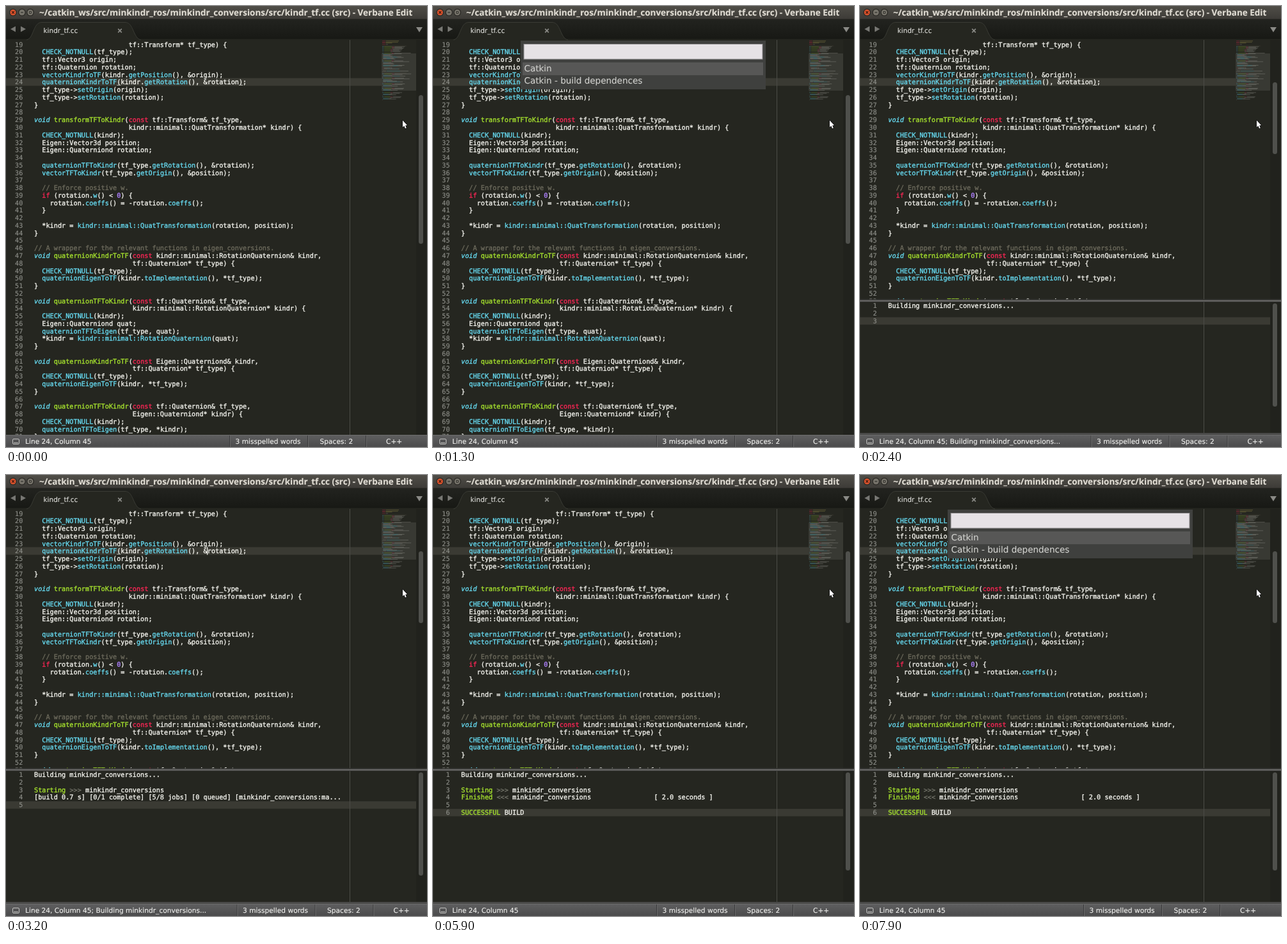
An HTML page with a canvas for the animation above (8 s loop, 658 px wide and 688 px high).

```html
<!DOCTYPE html>
<html lang="en">
<head>
<meta charset="utf-8">
<title>Build in editor</title>
<style>
  html, body { margin: 0; height: 100%; overflow: hidden; background: #252620; }
  canvas { display: block; }
</style>
</head>
<body>
<canvas id="stage" width="658" height="688"></canvas>
<script>
const ctx = document.getElementById('stage').getContext('2d');
const LOOP = 8000, STEP = 100;
const CHAR = 6.153, LINE = 11.765, LEFT = 44, FIRST = 19;
const MONO = '10.22px "DejaVu Sans Mono", monospace';
const SANS = '"DejaVu Sans", sans-serif';
const BG = '#252620', ACTIVE = '#3a3a33', WHITE = '#f4f4ee', GRAY = '#8d8e88';

// Times of the events, in ms
const MENU_OPEN = 500, PANEL_OPEN = 1700, BUILDING = 1900, STARTED = 2800,
      FINISHED = 5100, STATUS_RESET = 5700, MENU_AGAIN = 7400;

const COLORS = {
  comment: '#6c6a5c', type: '#66d9ef', name: '#a6e22e', keyword: '#f92655',
  call: '#66d9ef', number: '#ae81ff', string: '#d8c860', good: '#a6e22e', arrow: '#75766c'
};
const CPP = /(?<comment>\/\/.*)|(?<type>\bvoid\b)|(?<name>(?<=void )\w+)|(?<keyword>\bconst\b|\bif\b|#\w+|\bnamespace\b)|(?<call>[\w:]+(?=\())|(?<number>\b\d+\b)|(?<string>".*"|<.*>$)/g;
const LOG = /(?<good>Starting|Finished|SUCCESSFUL)|(?<arrow>>>>|<<<)/g;

const code = `#include "minkindr_conversions/kindr_tf.h"

#include <eigen_conversions/eigen_msg.h>
#include <glog/logging.h>

namespace tf {

// A wrapper for the relevant functions in eigen_conversions.
void quaternionKindrToTF(const Eigen::Quaterniond& kindr,
                         tf::Quaternion* tf_type);
void quaternionTFToKindr(const tf::Quaternion& tf_type,
                         Eigen::Quaterniond* kindr);
void vectorKindrToTF(const Eigen::Vector3d& kindr,
                     tf::Vector3* tf_type);
void vectorTFToKindr(const tf::Vector3& tf_type,
                     Eigen::Vector3d* kindr);

void transformKindrToTF(const kindr::minimal::QuatTransformation& kindr,
                        tf::Transform* tf_type) {
  CHECK_NOTNULL(tf_type);
  tf::Vector3 origin;
  tf::Quaternion rotation;
  vectorKindrToTF(kindr.getPosition(), &origin);
  quaternionKindrToTF(kindr.getRotation(), &rotation);
  tf_type->setOrigin(origin);
  tf_type->setRotation(rotation);
}

void transformTFToKindr(const tf::Transform& tf_type,
                        kindr::minimal::QuatTransformation* kindr) {
  CHECK_NOTNULL(kindr);
  Eigen::Vector3d position;
  Eigen::Quaterniond rotation;

  quaternionTFToKindr(tf_type.getRotation(), &rotation);
  vectorTFToKindr(tf_type.getOrigin(), &position);

  // Enforce positive w.
  if (rotation.w() < 0) {
    rotation.coeffs() = -rotation.coeffs();
  }

  *kindr = kindr::minimal::QuatTransformation(rotation, position);
}

// A wrapper for the relevant functions in eigen_conversions.
void quaternionKindrToTF(const kindr::minimal::RotationQuaternion& kindr,
                         tf::Quaternion* tf_type) {
  CHECK_NOTNULL(tf_type);
  quaternionEigenToTF(kindr.toImplementation(), *tf_type);
}

void quaternionTFToKindr(const tf::Quaternion& tf_type,
                         kindr::minimal::RotationQuaternion* kindr) {
  CHECK_NOTNULL(kindr);
  Eigen::Quaterniond quat;
  quaternionTFToEigen(tf_type, quat);
  *kindr = kindr::minimal::RotationQuaternion(quat);
}

void quaternionKindrToTF(const Eigen::Quaterniond& kindr,
                         tf::Quaternion* tf_type) {
  CHECK_NOTNULL(tf_type);
  quaternionEigenToTF(kindr, *tf_type);
}

void quaternionTFToKindr(const tf::Quaternion& tf_type,
                         Eigen::Quaterniond* kindr) {
  CHECK_NOTNULL(kindr);
  quaternionTFToEigen(tf_type, *kindr);
}

void vectorKindrToTF(const Eigen::Vector3d& kindr,
                     tf::Vector3* tf_type) {
  CHECK_NOTNULL(tf_type);
  vectorEigenToTF(kindr, *tf_type);
}

void vectorTFToKindr(const tf::Vector3& tf_type,
                     Eigen::Vector3d* kindr) {
  CHECK_NOTNULL(kindr);
  vectorTFToEigen(tf_type, *kindr);
}`.split('\n');

function tokenize(line, rule) {
  const tokens = [];
  let end = 0;
  const add = (text, col, kind) => text.trim() && tokens.push({ text, col, kind });
  for (const m of line.matchAll(rule)) {
    add(line.slice(end, m.index), end);
    add(m[0], m.index, Object.keys(m.groups).find(k => m.groups[k]));
    end = m.index + m[0].length;
  }
  add(line.slice(end), end);
  return tokens;
}
const codeTokens = code.map(line => tokenize(line, CPP));

function rect(x, y, w, h, color) {
  ctx.fillStyle = color;
  ctx.fillRect(x, y, w, h);
}
function pill(x, y, w, h, color, r = w / 2) {
  ctx.fillStyle = color;
  ctx.beginPath();
  ctx.roundRect(x, y, w, h, r);
  ctx.fill();
}
function shade(y, h, top, bottom) {
  const g = ctx.createLinearGradient(0, y, 0, y + h);
  g.addColorStop(0, top);
  g.addColorStop(1, bottom);
  rect(0, y, 658, h, g);
}
// The thin outline thickens small text a little.
function label(text, x, y, font, color, weight = 0.15) {
  ctx.font = font;
  ctx.fillStyle = ctx.strokeStyle = color;
  ctx.lineWidth = weight;
  ctx.fillText(text, x, y);
  ctx.strokeText(text, x, y);
  ctx.lineWidth = 1;
}
function polygon(points, color, outline) {
  ctx.beginPath();
  points.forEach(([x, y]) => ctx.lineTo(x, y));
  ctx.closePath();
  if (outline) {
    ctx.strokeStyle = outline;
    ctx.stroke();
  }
  ctx.fillStyle = color;
  ctx.fill();
}
function cross(x, y, r, color, width) {
  ctx.strokeStyle = color;
  ctx.lineWidth = width;
  ctx.beginPath();
  ctx.moveTo(x - r, y - r); ctx.lineTo(x + r, y + r);
  ctx.moveTo(x + r, y - r); ctx.lineTo(x - r, y + r);
  ctx.stroke();
  ctx.lineWidth = 1;
}

function textLine(number, tokens, mid) {
  const y = mid + 3.6, digits = String(number);
  label(digits, 26.4 - digits.length * CHAR, y, MONO, GRAY);
  for (const { text, col, kind } of tokens) {
    const font = kind === 'type' ? 'italic ' + MONO : MONO;
    label(text, LEFT + col * CHAR, y, font, COLORS[kind] || WHITE, 0.35);
  }
}

function caretAlpha(t) {
  if (t < MENU_OPEN) return Math.min(1, t / 300);
  if (t < PANEL_OPEN) return 0;
  if (t < 2100) return 1;
  const p = (t - 2850 + 2230) % 1115;
  return p < 250 ? p / 250 : p < 400 ? 1 : Math.max(0, 1 - (p - 400) / 250);
}

function minimap() {
  const pitch = 1.12, unit = 0.62;
  rect(587, 74, 54, 58, '#383933');
  ctx.globalAlpha = 0.32;
  codeTokens.forEach((tokens, i) => {
    for (const { text, col, kind } of tokens) {
      const indent = text.length - text.trimStart().length;
      rect(588 + (col + indent) * unit, 54 + i * pitch, text.trim().length * unit, 0.8, COLORS[kind] || '#c4c4be');
    }
  });
  ctx.globalAlpha = 1;
}

function editor(t, bottom) {
  const panel = t >= PANEL_OPEN;
  ctx.save();
  ctx.beginPath();
  ctx.rect(0, 53, 658, bottom - 53);
  ctx.clip();
  rect(0, 112.5, 587, 12, ACTIVE);
  rect(537, 53, 1, 616, '#4b4c46');
  for (let n = FIRST; n <= 71; n++) textLine(n, codeTokens[n - 1], 60 + (n - FIRST) * LINE);
  for (const col of [21, 52]) rect(LEFT + col * CHAR, 123, CHAR, 1, '#b5b5ae');
  ctx.globalAlpha = caretAlpha(t);
  rect(314, 112.5, 1.3, 12, WHITE);
  ctx.globalAlpha = 1;
  minimap();
  rect(641, 53, 17, 616, '#21221d');
  if (panel) pill(645, 119, 7, 112, '#4f504c');
  else pill(645, 139, 7, 232, '#4f504c');
  ctx.restore();
}

function logLines(t) {
  if (t < BUILDING) return [''];
  const lines = ['Building minkindr_conversions...', '', ''];
  if (t < STARTED) return lines;
  lines[2] = 'Starting >>> minkindr_conversions';
  if (t >= FINISHED) {
    return [...lines, 'Finished <<< minkindr_conversions' + ' '.repeat(16) + '[ 2.0 seconds ]', '', 'SUCCESSFUL BUILD'];
  }
  const seconds = (0.7 + (t - 3200) * 1.6 / 1700).toFixed(1);
  const jobs = Math.min(5, 5 - Math.floor((t - 3200) / 400));
  return [...lines, `[build ${seconds} s] [0/1 complete] [${jobs}/8 jobs] [0 queued] [minkindr_conversions:ma...`, ''];
}

function buildPanel(t) {
  const lines = logLines(t), top = 467.6;
  rect(0, 457.5, 658, 4.5, '#3a3a38');
  rect(0, 459, 658, 2, '#666664');
  rect(0, 462, 658, 207, BG);
  rect(0, top + (lines.length - 1) * LINE - 5.6, 641, 11.6, ACTIVE);
  rect(537, 462, 1, 207, '#4b4c46');
  lines.forEach((line, i) => textLine(i + 1, tokenize(line, LOG), top + i * LINE));
  rect(641, 462, 17, 207, '#21221d');
  if (t >= BUILDING) pill(645, 464, 7, t < FINISHED ? 161 : 153, '#4f504c');
  rect(0, 666, 658, 3, '#4a4a49');
}

function menu() {
  rect(137, 54, 383, 76, '#3f403e');
  rect(141.5, 59, 374, 24.5, '#8b898b');
  rect(142.5, 60, 372, 22.5, '#e6e2e6');
  rect(140, 88, 376, 20, '#575756');
  label('Catkin', 142.5, 102, '13.53px ' + SANS, '#cfcfcc');
  label('Catkin - build dependences', 142.5, 121, '13.53px ' + SANS, '#cfcfcc');
}

function frameTop() {
  shade(0, 20, '#504e48', '#3d3b37');
  rect(0, 20, 658, 1, '#2a2926');
  [[11, '#e2552d'], [25, '#77746b'], [38, '#77746b']].forEach(([x, color]) => {
    pill(x - 6, 4, 12, 12, '#2f2d29');
    pill(x - 4.5, 5.5, 9, 9, color);
  });
  cross(11, 10, 2, '#4a1c10', 1.3);
  rect(23, 9.5, 4, 1.2, '#33312d');
  ctx.strokeStyle = '#33312d';
  ctx.strokeRect(36.5, 8.5, 3, 3);
  label('~/catkin_ws/src/minkindr_ros/minkindr_conversions/src/kindr_tf.cc (src) - Verbane Edit',
    52, 15, 'bold 13.5px "Open Sans", sans-serif', '#dfdbd2');

  shade(21, 32, '#22231f', '#171814');
  rect(0, 51.5, 658, 1.5, BG);
  ctx.beginPath();
  ctx.moveTo(32, 53);
  ctx.bezierCurveTo(44, 50, 42, 25.5, 56, 25.5);
  ctx.lineTo(186, 25.5);
  ctx.bezierCurveTo(200, 25.5, 198, 50, 211, 53);
  ctx.fillStyle = BG;
  ctx.fill();
  ctx.strokeStyle = '#3a3b35';
  ctx.stroke();
  polygon([[7, 36], [15, 31.5], [15, 40.5]], '#777773');
  polygon([[31, 36], [23, 31.5], [23, 40.5]], '#777773');
  polygon([[641, 33], [651, 33], [646, 41]], '#8a8a86');
  label('kindr_tf.cc', 58.5, 41.5, '10.5px ' + SANS, '#dcdcd8');
  cross(178, 38.5, 2.8, '#8a8a86', 1.7);
}

function statusBar(t) {
  const building = t >= BUILDING && t < STATUS_RESET, shift = building ? 11.5 : 0;
  const font = '10.65px ' + SANS, ink = '#eeeeec';
  const write = (text, x) => label(text, x, 683, font, ink);
  shade(669, 19, '#5f5f60', '#4b4b4c');
  rect(0, 669, 658, 1, '#6c6c6c');
  ctx.strokeStyle = '#c2c2c0';
  ctx.beginPath();
  ctx.roundRect(10.5, 675.5, 10, 8, 1.5);
  ctx.stroke();
  rect(12, 681, 7, 1, '#c2c2c0');
  write('Line 24, Column 45' + (building ? '; Building minkindr_conversions...' : ''), 30);
  for (const x of [349, 471, 562]) {
    rect(x + shift, 670, 1, 18, '#38383a');
    rect(x + shift + 1, 670, 1, 18, '#6a6a6a');
  }
  write('3 misspelled words', 358.5 + shift);
  write('Spaces: 2', 490.5 + shift);
  write('C++', 594 + shift);
}

function pointer() {
  ctx.lineWidth = 1.6;
  polygon([[620, 178.5], [620, 189], [622.3, 187], [624, 191], [625.8, 190.2], [624.2, 186.4], [627, 186]], '#fff', '#111');
  ctx.lineWidth = 1;
}

function draw(t) {
  const panel = t >= PANEL_OPEN;
  rect(0, 0, 658, 688, BG);
  editor(t, panel ? 457.5 : 669);
  if (panel) buildPanel(t);
  if ((t >= MENU_OPEN && !panel) || t >= MENU_AGAIN) menu();
  frameTop();
  statusBar(t);
  pointer();
}

ctx.textRendering = 'geometricPrecision';
ctx.lineJoin = 'round';
let shown = -1;
function tick(now) {
  const t = Math.floor(now % LOOP / STEP) * STEP;
  if (t !== shown) draw(shown = t);
  requestAnimationFrame(tick);
}
tick(performance.now());
</script>
</body>
</html>
```
